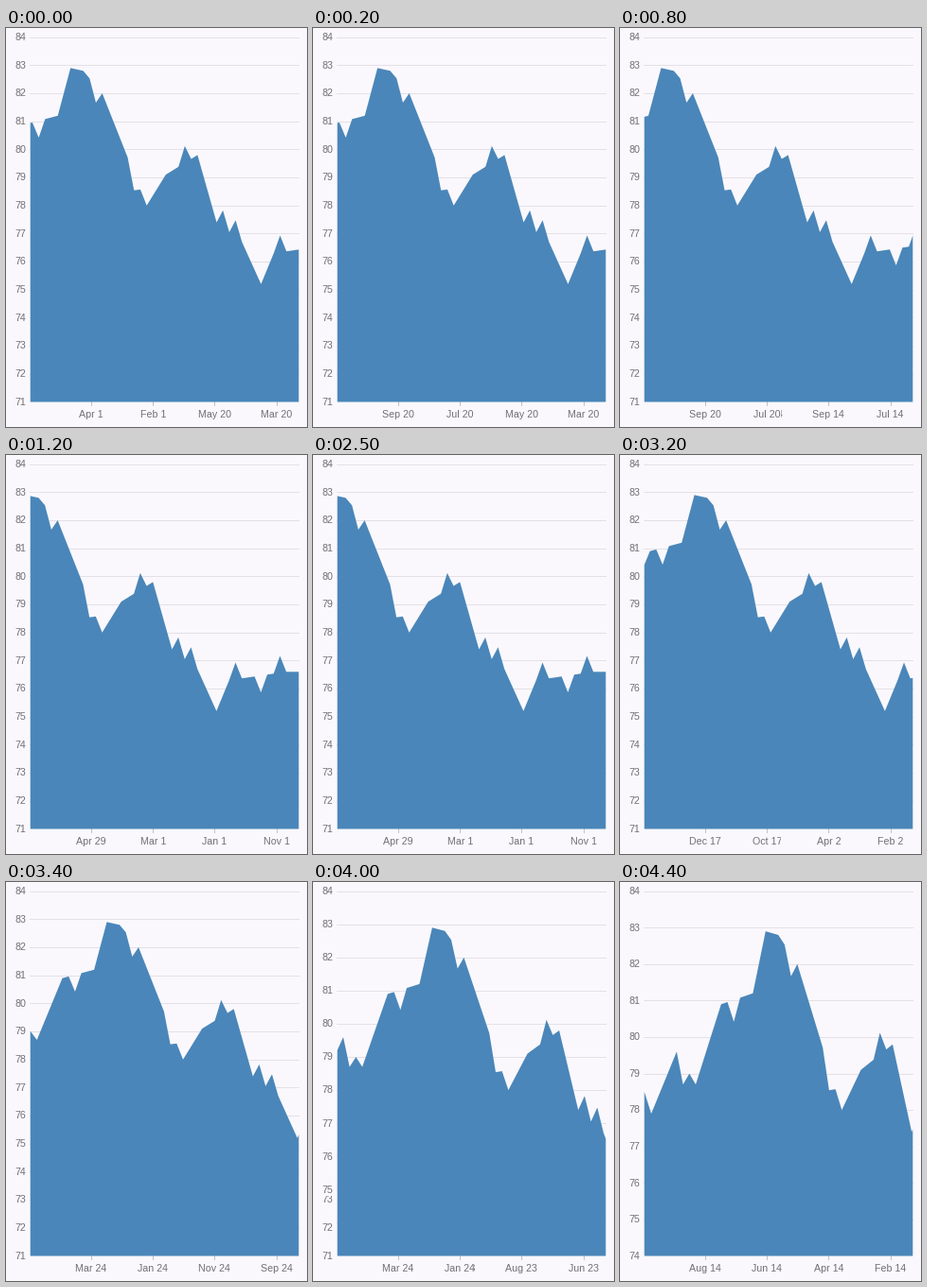
A matplotlib script for the animation above (4.6 s loop, 318 by 422 pixels).

```python
import math

import matplotlib.pyplot as plt
import numpy as np
from matplotlib.animation import FuncAnimation
from matplotlib.transforms import Bbox, TransformedBbox

W, H, DPI = 318, 422, 64
PX = 72 / DPI    # points per pixel
LEFT, RIGHT, TOP, BOTTOM = 25.2, 308.8, 9.2, 395
HIGH = 84
STEP_MS, LOOP_MS = 100, 4600

BG, FILL, GRID, TICK, INK = "#faf8fc", "#4a86b9", "#e3e1e5", "#c4c2c6", "#727074"
TICKS = 90 + 65.2 * np.arange(4)

# Trend through a few turning points, with single-point spikes on top.
TREND = [(0, 79), (2, 77.9), (6, 79.6), (9, 78.7), (13, 80.9), (18, 81.2),
         (20, 82.9), (22, 82.8), (25, 82), (32, 78), (35, 79.1), (40, 79.8),
         (43, 77.4), (47, 76.7), (50, 75.2), (52, 76.3), (61, 76.6)]
SPIKE = 0.6
index = np.arange(65)
values = np.interp(index, *zip(*TREND))
values[[38, 44, 46, 53, 60]] += SPIKE
values[[7, 15, 24, 30, 57]] -= SPIKE

# Pan stops: start ms, ms when the late tiles repaint, date at the first tick.
STOPS = [
    (-100, 0, "1990-04-01"),
    (0, 100, "1989-09-20"),
    (800, 900, "1990-01-14"),
    (1100, 1200, "1990-04-29"),
    (3000, 3000, "1989-12-17"),
    (3200, 3300, "1989-08-02"),
    (3300, 3400, "1989-03-24"),
    (4000, 4100, "1988-12-23"),
    (4100, 4300, "1988-10-20"),
    (4300, 4400, "1988-08-14"),
]
PX_PER_DAY, PX_PER_POINT = 0.2131, 6.71
LATE_X, LATE_Y = 170, 332    # tiles left of and below these repaint late


def data_x(date):
    days = (np.datetime64(date) - np.datetime64("1989-03-24")).astype(int)
    return 106 - days * PX_PER_DAY + (index - 20) * PX_PER_POINT


def visible_line(date):
    xs = data_x(date)
    inner = xs[(xs > LEFT) & (xs < RIGHT)]
    line_x = np.concatenate([[LEFT], inner, [RIGHT]])
    return line_x, np.interp(line_x, xs, values)


def axis_low(date):
    return HIGH - math.ceil((HIGH - visible_line(date)[1].min()) * 1.4)


def y_at(value, low):
    return TOP + (HIGH - value) * (BOTTOM - TOP) / (HIGH - low)


def tick_dates(first):
    """Names of four dates, ten months apart."""
    date, names = np.datetime64(first), []
    for _ in TICKS:
        month = date.astype("datetime64[M]")
        offset = date - month.astype("datetime64[D]")
        names.append(f"{date.item():%b} {date.item().day}")
        date = (month + 10).astype("datetime64[D]") + offset
    return names


fig = plt.figure(figsize=(W / DPI, H / DPI), dpi=DPI, facecolor=BG)
ax = fig.add_axes([0, 0, 1, 1])
ax.set_xlim(0, W)
ax.set_ylim(H, 0)
ax.axis("off")
for x in TICKS:
    ax.plot([x, x], [BOTTOM, BOTTOM + 4], color=TICK, lw=PX)

drawn = []


def label(x, y, text, align, box):
    t = ax.text(x, y + 3.8, text, ha=align, va="baseline", color=INK,
                family="Liberation Sans", size=10.6 * PX)
    t.set_clip_box(TransformedBbox(Bbox(box), ax.transData))
    t.set_clip_on(True)
    drawn.append(t)


def date_labels(date, x0, x1):
    for x, name in zip(TICKS, tick_dates(date)):
        label(x, 408.3, name, "center", [[x0, 400], [x1, H]])


def value_labels(low, y0, y1):
    for value in range(low, HIGH + 1):
        label(20.9, y_at(value, low), str(value), "right", [[0, y0], [24, y1]])


def draw(frame):
    while drawn:
        drawn.pop().remove()
    now = frame * STEP_MS
    before, (_, repaint, date) = [s for s in STOPS if s[0] <= now][-2:]
    late = before[2] if now < repaint else date
    low = axis_low(date)

    for value in range(low + 1, HIGH + 1):
        y = math.floor(y_at(value, low)) + 0.5
        drawn.extend(ax.plot([LEFT, RIGHT], [y, y], color=GRID, lw=PX, zorder=1))

    line_x, line_v = visible_line(date)
    drawn.append(ax.fill_between(line_x, y_at(line_v, low), BOTTOM,
                                 color=FILL, lw=0, zorder=2))

    date_labels(late, 0, LATE_X)
    date_labels(date, LATE_X, W)
    value_labels(low, 0, LATE_Y)
    value_labels(axis_low(late), LATE_Y, H)
    return drawn


anim = FuncAnimation(fig, draw, frames=LOOP_MS // STEP_MS, interval=STEP_MS,
                     init_func=lambda: draw(0), repeat=True, repeat_delay=0,
                     blit=False)
plt.show()
```
